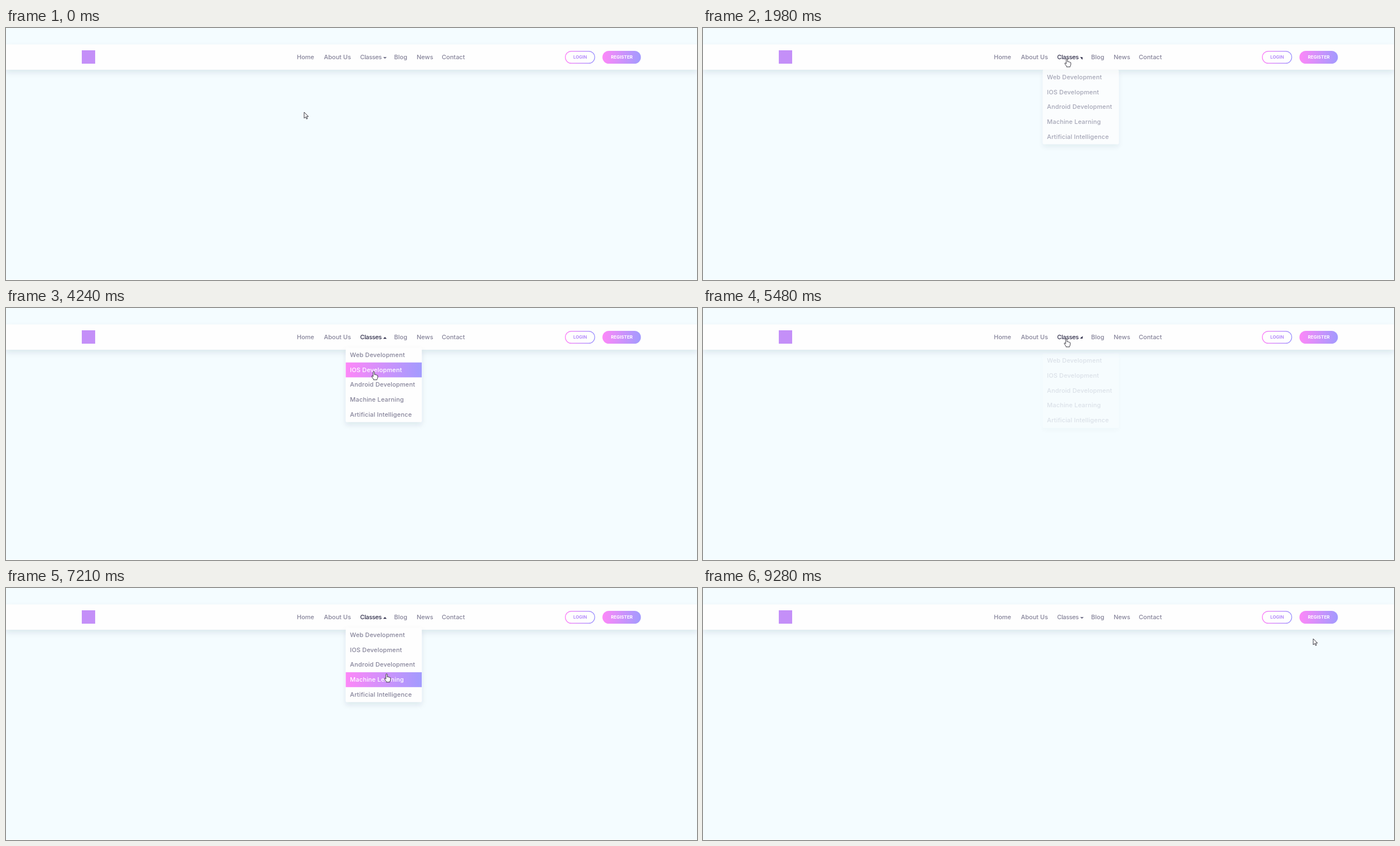
Recreate the animation shown at these times as an HTML page. Size 1240 by 452 pixels, loop 9370 ms.

```html
<!DOCTYPE html>
<html lang="en">
<head>
<meta charset="utf-8">
<title>Navigation with dropdown</title>
<style>
  html, body { margin: 0; width: 100%; height: 100%; overflow: hidden; background: #f4fcff; }
  svg { display: block; width: 100%; height: 100%; }
  text { font: 500 11px Inter, "Open Sans", sans-serif; fill: #858399; }
  #menu text { letter-spacing: .15px; }
  .btn text { font-size: 8px; font-weight: 700; text-anchor: middle; }
  .cursor { fill: #fff; stroke: #24222c; stroke-width: .9; stroke-linejoin: round; }
</style>
</head>
<body>
<svg viewBox="0 0 1240 452">
  <defs>
    <linearGradient id="pink"><stop stop-color="#fd87f8"/><stop offset="1" stop-color="#a29bfe"/></linearGradient>
    <linearGradient id="violet"><stop stop-color="#a29bfe"/><stop offset="1" stop-color="#fd87f8"/></linearGradient>
    <filter id="shadow" filterUnits="userSpaceOnUse" x="-40" y="0" width="1320" height="260">
      <feDropShadow dx="0" dy="5" stdDeviation="5" flood-color="#1c3a4a" flood-opacity=".1"/>
    </filter>
  </defs>
  <rect width="1240" height="452" fill="#f4fcff"/>
  <rect y="451" width="1240" height="1" fill="#fff"/>
  <rect y="29.5" width="1240" height="45.3" fill="#fefefe" filter="url(#shadow)"/>
  <rect x="136" y="40" width="24" height="24" fill="#c48ff8"/>
  <g id="nav"></g>
  <path id="caret" d="M-3.2-1.6H3.2L0 1.7Z"/>
  <g class="btn">
    <rect id="login" x="1003.7" y="41.7" width="52.8" height="21.6" rx="10.8" stroke="url(#pink)" stroke-width="1.4"/>
    <text id="loginText" x="1030.3" y="55.2">LOGIN</text>
    <rect id="register" x="1070.3" y="41" width="69" height="23" rx="11.5"/>
    <text x="1105" y="55.2" style="fill:#fff">REGISTER</text>
  </g>
  <g id="menu">
    <rect x="609.7" y="71" width="136.4" height="133.5" rx="2" fill="#fefefe" filter="url(#shadow)"/>
  </g>
  <path id="arrow" class="cursor" d="M0 0V10.9L2.6 8.5 4.3 12.2 6 11.5 4.3 7.8H7.7Z"/>
  <path id="hand" class="cursor" d="M-1.2 9V1.2a1.2 1.2 0 0 1 2.4 0V5.4q2-.8 2.2.6 1.8-.6 2 .6 1.6-.4 1.6 1.2v2.7q0 1.6-1.2 3V14.8H-.6V13.6L-3.6 9.3q-.6-1.3.4-1.6 1-.2 2 1.5Z"/>
</svg>
<script>
const LOOP = 9370, ROW = 26.7, TOP = 71, FADE = 550, SLIDE = 13.3;
const NAV = [["Home", 522], ["About Us", 570.5], ["Classes", 635.5], ["Blog", 696.5], ["News", 737], ["Contact", 782]];
const CLASSES = ["Web Development", "IOS Development", "Android Development", "Machine Learning", "Artificial Intelligence"];
const OPEN = [[1750, 4600], [5390, 7680]];

// pointer stops: time, x, y
const STOPS = [
  [0, 535, 151], [880, 597, 58], [1000, 597, 58], [1130, 597, 54.5], [1330, 597, 54.5], [1430, 599, 55],
  [1500, 599, 55], [1900, 653, 55], [2970, 654, 55], [3060, 656.5, 69], [3240, 660, 87],
  [3930, 660, 87], [4240, 660, 114], [4390, 660, 114], [4770, 579, 57], [4850, 579, 57],
  [5300, 628, 57], [5480, 652, 55], [6100, 652, 55], [6410, 660, 90], [6480, 660, 90], [6560, 661, 94],
  [6640, 661, 94], [7210, 683, 154], [7360, 684, 168], [7430, 684, 168], [8370, 1030, 52],
  [8440, 1036, 53], [8740, 1036, 53], [8990, 1095, 53], [9200, 1095, 53], [9280, 1095, 91], [LOOP, 1095, 91]
];

const $ = id => document.getElementById(id);
const make = (parent, tag, attrs, label = "") => {
  const el = document.createElementNS("http://www.w3.org/2000/svg", tag);
  for (const key in attrs) el.setAttribute(key, attrs[key]);
  el.textContent = label;
  return parent.appendChild(el);
};
const show = (el, on) => { el.style.display = on ? "" : "none"; };
const inside = (p, x0, y0, x1, y1) => p.x >= x0 && p.x < x1 && p.y >= y0 && p.y < y1;

const links = NAV.map(([label, x]) => make($("nav"), "text", { x, y: 56 }, label));
links[2].style.letterSpacing = "-.4px";
const rows = CLASSES.map((label, i) => ({
  bar: make($("menu"), "rect", { x: 609.7, y: TOP + i * ROW, width: 136.4, height: ROW, rx: i % 4 ? 0 : 2, fill: "url(#pink)" }),
  text: make($("menu"), "text", { x: 617.3, y: 88 + i * ROW }, label)
}));

// cubic-bezier(.25, .1, .25, 1)
function ease(t) {
  if (t <= 0 || t >= 1) return t <= 0 ? 0 : 1;
  const bez = (a, b, u) => 3 * a * u * (1 - u) ** 2 + 3 * b * u * u * (1 - u) + u ** 3;
  let lo = 0, hi = 1;
  for (let i = 0; i < 20; i++) {
    const mid = (lo + hi) / 2;
    if (bez(.25, .25, mid) < t) lo = mid; else hi = mid;
  }
  return bez(.1, 1, lo);
}

function pointer(t) {
  const i = STOPS.findIndex(s => s[0] > t);
  const [t0, x0, y0] = STOPS[i - 1], [t1, x1, y1] = STOPS[i];
  const u = (t - t0) / (t1 - t0), k = u * u * (3 - 2 * u);
  return { x: x0 + (x1 - x0) * k, y: y0 + (y1 - y0) * k };
}

function draw(t) {
  const p = pointer(t);
  const span = OPEN.find(([from, to]) => t >= from && t < to);
  const k = span ? ease((t - span[0]) / FADE) : 0;
  const about = inside(p, 570, 42, 620, 66);
  const login = inside(p, 1003, 41, 1057, 64);
  const register = inside(p, 1070, 41, 1139, 64);
  const row = span && inside(p, 609.7, TOP, 746, 204.5) ? Math.floor((p.y - TOP) / ROW) : -1;

  links.forEach((el, i) => {
    el.style.fill = (i === 1 && about) || (i === 2 && span) ? "#302e4a" : "";
  });
  $("caret").setAttribute("transform", `translate(680 53.6) rotate(${-180 * k})`);
  $("caret").setAttribute("fill", span ? "#302e4a" : "#76748c");

  show($("menu"), span);
  $("menu").setAttribute("opacity", k);
  $("menu").setAttribute("transform", `translate(0 ${SLIDE * (1 - k)})`);
  rows.forEach(({ bar, text }, i) => {
    show(bar, i === row);
    text.style.fill = i === row ? "#fff" : "";
  });

  $("login").setAttribute("fill", login ? "url(#pink)" : "#fefefe");
  $("loginText").style.fill = login ? "#fff" : "#b78ffa";
  $("register").setAttribute("fill", register ? "url(#violet)" : "url(#pink)");

  const link = span || about || login || register;
  show($("hand"), link);
  show($("arrow"), !link);
  for (const id of ["hand", "arrow"]) $(id).setAttribute("transform", `translate(${p.x} ${p.y})`);
}

const start = performance.now();
function tick() {
  draw((performance.now() - start) % LOOP);
  requestAnimationFrame(tick);
}
tick();
</script>
</body>
</html>
```
